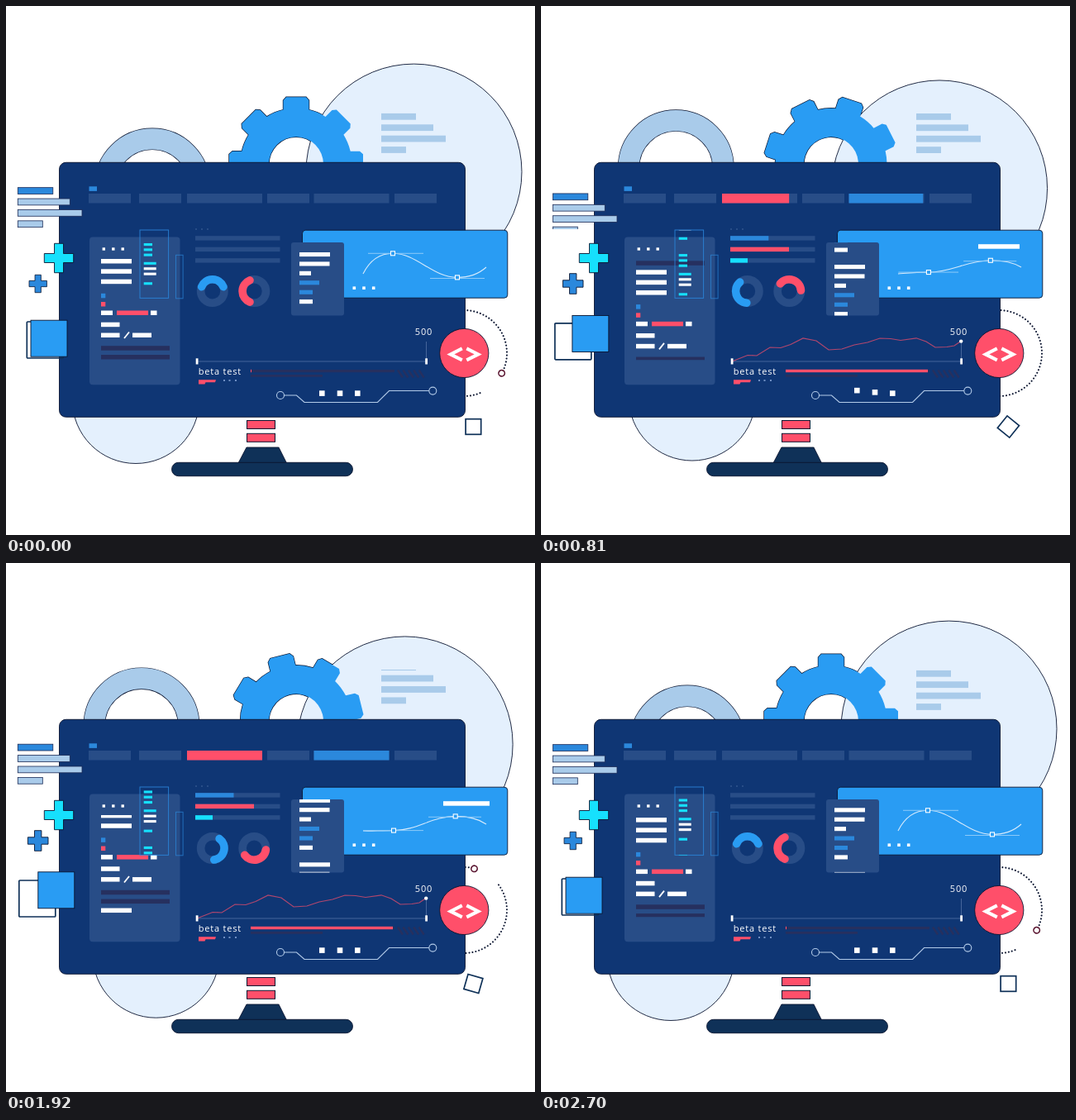
These frames come from a looping animation (640x640 px, 2.73 s). An HTML page:

```html
<!DOCTYPE html>
<html lang="en">
<head>
<meta charset="utf-8">
<title>Dashboard</title>
<style>
html, body { margin: 0; width: 100%; height: 100%; overflow: hidden; background: #fff; }
svg { display: block; width: 100vw; height: 100vh; }
text { font-family: "Open Sans", "Noto Sans", sans-serif; font-size: 11px; letter-spacing: .8px; fill: #fff; }
</style>
</head>
<body>
<svg id="stage" viewBox="0 0 640 640"></svg>
<script>
const LOOP = 2730, STEP = 30;
const WHITE = '#fff', NAVY = '#0f3674', DEEP = '#0f3158', DIM = '#284d87', DARK = '#26305f',
  BLUE = '#299cf3', MID = '#2b88dc', PALE = '#a9cbea', ICE = '#e4f0fd', RED = '#ff4f6a',
  CYAN = '#16e0fd', EDGE = '#0b1530';
const stage = document.getElementById('stage');

// ---- builders
function el(tag, attrs, parent = stage) {
  const node = document.createElementNS('http://www.w3.org/2000/svg', tag);
  set(node, attrs);
  parent.appendChild(node);
  return node;
}
function set(node, attrs) {
  for (const k in attrs) node.setAttribute(k, attrs[k]);
}
function box(x, y, w, h, fill, parent, more) {
  return el('rect', { x, y, width: w, height: h, fill, ...more }, parent);
}
function line(d, stroke, width = 1, parent, more) {
  return el('path', { d, fill: 'none', stroke, 'stroke-width': width, ...more }, parent);
}
function disc(cx, cy, r, fill, parent, more) {
  return el('circle', { cx, cy, r, fill, ...more }, parent);
}
function move(node, x, y, extra = '') {
  node.setAttribute('transform', `translate(${x.toFixed(3)} ${y.toFixed(3)}) ${extra}`);
}
let clips = 0;
function clipped(x, y, w, h) {
  const id = 'clip' + clips++;
  box(x, y, w, h, WHITE, el('clipPath', { id }));
  return el('g', { 'clip-path': `url(#${id})` });
}
const edge = { stroke: EDGE, 'stroke-width': 0.9 };

// ---- motion helpers
const clamp = v => Math.max(0, Math.min(1, v));
const mod = (a, b) => ((a % b) + b) % b;
const lerp = (a, b, k) => a + (b - a) * k;
const inOut = (p, k) => p < .5 ? Math.pow(2 * p, k) / 2 : 1 - Math.pow(2 - 2 * p, k) / 2;
const rise = (t, from, len = 10) => inOut(clamp((t - from) / len), 3);
const bump = (t, from, len) => Math.sin(Math.PI * clamp((t - from) / len));
const gate = (t, on, off) => rise(t, on) - rise(t, off);
function track(keys, t) {
  let i = 1;
  while (i < keys.length - 1 && keys[i][0] < t) i++;
  const [a, va] = keys[i - 1], [b, vb] = keys[i];
  return lerp(va, vb, clamp((t - a) / (b - a)));
}

// ---- gear outline
function gearPath() {
  let d = '';
  const tooth = [[-15.5, -65.7], [-15.5, -77], [-12, -81], [12, -81], [15.5, -77], [15.5, -65.7]];
  for (let i = 0; i < 8; i++) {
    const a = i * Math.PI / 4, c = Math.cos(a), s = Math.sin(a);
    tooth.forEach(([x, y], j) => {
      const p = `${(x * c - y * s).toFixed(2)} ${(x * s + y * c).toFixed(2)}`;
      d += j ? `L${p}` : i ? `A67.5 67.5 0 0 1 ${p}` : `M${p}`;
    });
  }
  return d + 'A67.5 67.5 0 0 1 -15.5 -65.7ZM33 0A33 33 0 1 0 -33 0A33 33 0 1 0 33 0Z';
}

// ---- backdrop shapes
const gearD = gearPath();
const gearEdge = el('path', { d: gearD, fill: 'none', stroke: EDGE, 'stroke-width': 1.4 });
const bigDisc = disc(0, 0, 130.5, ICE, stage, edge);
const lowDisc = disc(0, 0, 76.7, ICE, stage, edge);
const lock = el('g', {});
disc(0, 0, 57.2, 'none', lock, { stroke: EDGE, 'stroke-width': 26.4 });
disc(0, 0, 57.2, 'none', lock, { stroke: PALE, 'stroke-width': 25.2 });
const gear = el('path', { d: gearD, fill: BLUE, 'fill-rule': 'evenodd' });

const orbit = el('g', {});
for (let a = 40; a < 356; a += 4.4) {
  const r = a * Math.PI / 180;
  disc(52 * Math.sin(r), -52 * Math.cos(r), 1.05, EDGE, orbit);
}
disc(0, -51.7, 3.7, WHITE, orbit, { stroke: '#5a1530', 'stroke-width': 1.6 });
const spinner = box(-9.3, -9.3, 18.6, 18.6, WHITE, stage, { stroke: DEEP, 'stroke-width': 1.7 });

// two copies that roll upwards through a window
function roller(clip, rows, outline) {
  const win = clipped(...clip);
  return [0, 1].map(() => {
    const g = el('g', {}, win);
    rows.forEach(([x, y, w, c]) => box(x, y, w, 7.8, c, g, outline));
    return g;
  });
}
function roll(pair, start, n) {
  const e = inOut(clamp(mod(n - start, 30) / 20), 5);
  move(pair[0], 0, -92 * e);
  move(pair[1], 0, 92 * (1 - e));
}
const notes = roller([450, 129, 90, 51], [42, 63, 78, 30].map((w, i) => [454, 130 + 13.4 * i, w, PALE]));

// ---- monitor
box(64.5, 189.3, 491, 308, NAVY, stage, { rx: 8, ...edge });
[501.5, 517.3].forEach(y => box(291.5, y, 34, 10, RED, stage, { stroke: EDGE, 'stroke-width': 1 }));
el('path', { d: 'M291 534H330L339.5 553H281Z', fill: DEEP, ...edge });
box(200.5, 552.3, 219, 16.4, DEEP, stage, { rx: 8.2, ...edge });

// navigation
box(100.5, 218.3, 9.5, 5.6, MID);
[[100, 51], [161, 51], [219, 91], [316, 51], [372.5, 91], [470, 51]]
  .forEach(([x, w]) => box(x, 227, w, 11.5, DIM));

// bars that fill up and empty: node, full width, on, off, least width
const fills = [
  [box(219, 227, 0, 11.5, RED), 91, 1, 24, 0],
  [box(372.5, 227, 0, 11.5, MID), 91, 3.4, 25.5, 0]
];
[[MID, 46.5, 4, 26], [RED, 71, 5, 27], [CYAN, 21, 6, 28.8]].forEach(([c, w, on, off], i) => {
  const y = 278.2 + 13.5 * i;
  box(229, y, 102.5, 5.4, DIM);
  fills.push([box(229, y, 0, 5.4, c), w, on, off, 0]);
});
[230, 237, 244].forEach(x => box(x - 1, 269, 2, 2, DIM));

// donuts
function donut(cx, color) {
  disc(cx, 345, 14.2, 'none', stage, { stroke: DIM, 'stroke-width': 9.6 });
  const a = 68 * Math.PI / 180, x = 14.2 * Math.sin(a), y = -14.2 * Math.cos(a);
  return line(`M${-x} ${y}A14.2 14.2 0 0 1 ${x} ${y}`, color, 9.6, stage, { 'stroke-linecap': 'round' });
}
const donutA = donut(249.8, BLUE), donutB = donut(300.3, RED);

// chart
line('M231 430H508.5M508.5 406V427', '#45659b');
const pts = [[231, 430], [250, 422.5], [261, 423], [277, 413], [290, 413.5], [302, 409.5], [317, 402],
  [333, 405], [348, 416], [364, 415], [379, 410], [395, 407], [410, 402], [423, 402.5], [435, 404.5],
  [454, 401.8], [466, 406], [477, 413], [491, 412.5], [500, 411], [508, 405.5]];
const graph = line('M' + pts.join('L'), RED, 1.2, stage, { opacity: .68 });
const span = graph.getTotalLength();
const tip = disc(508.2, 405.6, 2.2, WHITE);
[229.7, 507.2].forEach(x => box(x, 426.3, 2.8, 7.2, WHITE));
el('text', { x: 494.8, y: 398 }).textContent = '500';
el('text', { x: 232.8, y: 446 }).textContent = 'beta test';
el('path', { d: 'M233 452.2H254L253 455.2H241.5L240.5 457.4H233Z', fill: RED });
[264, 270.5, 278].forEach(x => box(x - 1, 452, 2, 2, '#6f8fc4'));
box(296, 440, 174, 3.2, DARK);
box(296, 446, 87, 2.8, DARK);
fills.push([box(296, 439.8, 0, 3.4, RED), 172, 1.6, 28, 1]);
for (let x = 474; x < 504; x += 6.4) line(`M${x} 440.5L${x + 6} 449.5`, DARK, 2.4);

// circuit
line('M336.7 471H351.5L361 479.5H449.5L463.5 465.5H511.8', '#b3cbe9', 1.1);
disc(332, 471, 4.5, 'none', stage, { stroke: '#b3cbe9', 'stroke-width': 1.1 });
disc(516.3, 465.6, 4.5, 'none', stage, { stroke: '#b3cbe9', 'stroke-width': 1.1 });
const hops = [382.3, 404, 425.3].map(x => box(x - 3.3, 465.3, 6.6, 6.6, WHITE));

// endless list: rows are [x, y, w, colour]
function scroller(clip, rows, h, period, draw) {
  const g = el('g', {}, clipped(...clip));
  [-period, 0].forEach(dy => {
    const copy = el('g', { transform: `translate(0 ${dy})` }, g);
    rows.forEach(([x, y, w, c]) => box(x, y, w, h, c, copy));
    if (draw) draw(copy);
  });
  return g;
}

// editor card
box(101, 279.5, 109.5, 178.7, DIM, stage, { rx: 4 });
[118.3, 129.8, 141.2].forEach(x => box(x - 1.7, 292.3, 3.4, 3.4, WHITE));
const editor = scroller([110, 305, 95, 123.3], [
  [115, 306, 37, WHITE], [115, 318.3, 37, WHITE], [115, 330.7, 37, WHITE],
  [115, 347.8, 5.3, MID], [115, 358, 5.3, RED],
  [115, 368.5, 14, WHITE], [134, 368.5, 38, RED], [175, 368.5, 7.5, WHITE],
  [115, 382.7, 22.5, WHITE], [115, 395.5, 22.5, WHITE], [153, 395.5, 23, WHITE],
  [115, 411.2, 83, DARK], [115, 422, 83, DARK]
], 5.5, 127, g => line('M143 402L149 394.5', WHITE, 1.8, g));

// narrow frames
box(162, 271, 34.6, 82.4, 'none', stage, { stroke: MID, 'stroke-width': 1, opacity: .85 });
box(205.5, 301.3, 8.6, 52.5, 'none', stage, { stroke: MID, 'stroke-width': 1, opacity: .7 });
const strip = scroller([163, 271, 33, 82.5], [
  [166.7, 287, 10.3, CYAN], [166.7, 293.3, 10.3, CYAN], [166.7, 299.6, 10.3, CYAN],
  [166.7, 309.8, 15, CYAN], [166.7, 316.2, 15, WHITE], [166.7, 322.6, 15, WHITE],
  [166.7, 334.2, 10.3, CYAN]
], 3.1, 67.5);

// curve panel
box(358.5, 271.2, 248.3, 82, BLUE, stage, { rx: 4, ...edge });
const curve = line('', '#d5eafc', 1.1);
const arms = line('', '#8ccaf9', 1);
const knobs = [0, 1].map(() => box(-2.5, -2.5, 5, 5, BLUE, stage, { stroke: WHITE, 'stroke-width': 1.1 }));
fills.push([box(529, 288.2, 0, 5.5, WHITE), 56, 1.8, 24, 0]);
[421.3, 433, 444.7].forEach(x => box(x - 1.8, 339.4, 3.6, 3.6, WHITE));

// list card
box(345, 286, 64, 88.6, DIM, stage, { rx: 3 });
const list = scroller([346, 286, 62, 88.6], [
  [355, 298, 37, WHITE], [355, 309.4, 36.5, WHITE], [355, 320.8, 14, WHITE],
  [355, 332.2, 24, MID], [355, 343.7, 16, MID], [355, 355.1, 16, WHITE]
], 5.1, 77.6);

// ---- floating items on the left
const lines = roller([13, 218, 84, 52],
  [[14.3, 219.2, 42.5, MID], [14.3, 232.6, 63, PALE], [14.3, 246, 77.7, PALE], [14.3, 259.4, 30, PALE]],
  { stroke: '#1b2a55', 'stroke-width': .8 });
function plus(r, w, fill) {
  return el('path', {
    d: `M${-w} ${-r}H${w}V${-w}H${r}V${w}H${w}V${r}H${-w}V${w}H${-r}V${-w}H${-w}Z`, fill, ...edge
  });
}
const plusA = plus(17.7, 5.5, CYAN), plusB = plus(12.3, 4.2, MID);
const frame = box(0, 0, 44, 44, 'none', stage, { stroke: DEEP, 'stroke-width': 1.7, rx: 1 });
const tile = box(0, 0, 44, 44, BLUE, stage, edge);

// ---- code badge
const badge = el('g', {});
disc(0, 0, 29.6, RED, badge, edge);
line('M-2.5 -5.6L-16.5 1.4L-2.5 8.4M3 -5.6L17 1.4L3 8.4', WHITE, 4, badge);

const spinKeys = [[0, 0], [1.5, 12], [4, 16], [7, 15], [11, -15], [14, -17], [17, -15], [19, 12],
  [21, 51], [22, 90], [24, 180], [26, 270], [27, 309], [30, 360]];

function drawCurve(k) {
  const m = (a, b) => lerp(a, b, k).toFixed(2);
  const x1 = m(468, 469), y1 = m(299.3, 323.6), x2 = m(546, 543.7), y2 = m(328.4, 306.4);
  curve.setAttribute('d', `M432 324C440 ${m(308, 324.5)} 452 ${y1} ${x1} ${y1}` +
    `C497 ${y1} 516 ${y2} ${x2} ${y2}C560 ${y2} 571 ${m(325, 309)} 581 316`);
  arms.setAttribute('d', `M${m(438, 432)} ${y1}H505M${m(513, 511)} ${m(329.5, 307.3)}H${m(579, 575)}`);
  move(knobs[0], +x1, +y1);
  move(knobs[1], +x2, +y2);
}

function draw(n) {
  const half = n % 45, third = n % 30;
  const sway = (1 - Math.cos(n / 90 * 2 * Math.PI)) / 2;

  move(bigDisc, 493.5 - 17.5 * sway, 200.6 + 30.3 * sway);
  move(lowDisc, 157 + 39.5 * sway, 476.8 - 5.3 * sway);
  move(lock, 177 - 21 * sway, 218 - 34 * sway);
  [gear, gearEdge].forEach(g => move(g, 351, 191.3, `rotate(${4 * n})`));
  move(orbit, 554, 420, `rotate(${118 + 4 * n})`);
  move(spinner, 565.4, 509, `rotate(${track(spinKeys, third)})`);
  roll(notes, 27, n);
  roll(lines, 14, n);

  fills.forEach(([bar, w, on, off, min]) =>
    bar.setAttribute('width', Math.max(min, w * gate(half, on, off)).toFixed(2)));
  move(donutA, 249.8, 345, `rotate(${-4 * n})`);
  move(donutB, 300.3, 345, `rotate(${270 + 4 * n})`);

  const a = span * rise(half, 28), b = span * rise(half, 1.6);
  const shown = b - a;
  set(graph, {
    'stroke-dasharray': `0 ${a} ${shown} ${span + 9}`,
    visibility: shown > .3 ? 'visible' : 'hidden'
  });
  tip.setAttribute('r', 2.2 * (rise(half, 10, 3) - rise(half, 38, 3)));

  hops.forEach((h, i) => move(h, 0, -4.7 * bump(mod(n, 22.5), 2 + 1.7 * i, 9.5)));
  move(editor, 0, mod(-4.21 * n, 127));
  move(strip, 0, mod(2.983 * n, 67.5));
  move(list, 0, mod(3.43 * n, 77.6));
  drawCurve(rise(half, 0, 7) - rise(half, 25, 8));

  const slide = gate(half, 0, 24);
  move(tile, 30 + 8.8 * slide, 380.2 - 6.4 * slide);
  move(frame, 25.3 - 9.5 * slide, 382 + 2 * slide);
  move(plusA, 64, 305, `scale(${1 + .15 * bump(half, 2, 10)})`);
  move(plusB, 38.7, 336, `scale(${1 - .155 * bump(mod(half + 6, 45), 0, 19)})`);
  move(badge, 554.3, 420, `scale(${1 + .1 * bump(half, 2, 10)})`);
}

function tick() {
  draw(Math.floor((performance.now() % LOOP) / STEP + 1e-6));
  requestAnimationFrame(tick);
}
tick();
</script>
</body>
</html>
```
